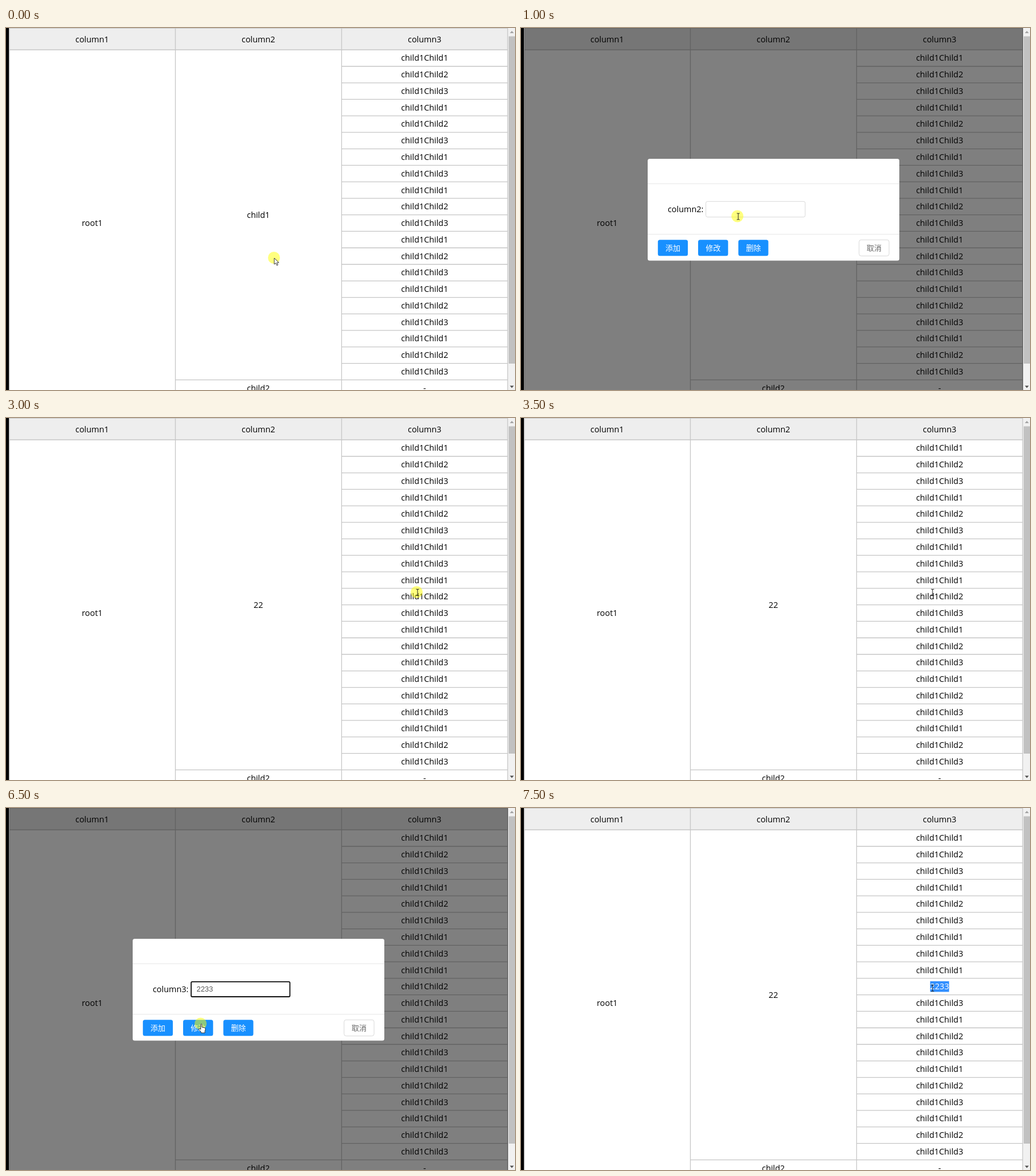
These frames come from a looping animation (888 by 631 pixels, 8000 ms). An HTML page:

```html
<!DOCTYPE html>
<html lang="en">
<head>
<meta charset="utf-8">
<title>Table editor</title>
<style>
  html, body { margin: 0; width: 100%; height: 100%; overflow: hidden; background: #fff; }
  svg { display: block; width: 888px; height: 631px; }
  text { font: 14.4px "Open Sans", "Noto Sans", sans-serif; }
  .mid { text-anchor: middle; }
  .btn { font: 500 13px "Noto Sans CJK SC", "Noto Sans CJK", sans-serif; }
  #value { font: 12.8px "Liberation Sans", Arial, sans-serif; fill: #555; }
</style>
</head>
<body>
<svg viewBox="0 0 888 631">
  <g id="table">
    <rect width="5.5" height="631"/>
    <rect x="5.5" width="870" height="38" fill="#eee"/>
    <path id="lines" fill="none" stroke="#c6c6c6" stroke-width="1.3"/>
    <rect id="mark" y="302" height="18.5" fill="#3390ff"/>
  </g>
  <rect id="shade" x="5.5" width="870.5" height="631" opacity=".5"/>
  <g id="scrollbar">
    <rect x="876" width="12" height="631" fill="#f1f1f1"/>
    <rect x="877" y="14.500" width="11" height="570.5" fill="#c1c1c1"/>
    <path d="M879 9l3.500-4 3.500 4z" fill="#a3a3a3"/>
    <path d="M879 623.500l3.500 4 3.500-4z" fill="#505050"/>
  </g>
  <g id="dialog">
    <rect x="221" y="228" width="439" height="177.500" rx="3.500" fill="#fff"/>
    <path d="M221 271.500H660M221 359.500H660" stroke="#e8e8e8"/>
    <text id="label" x="256" y="321.300"></text>
    <rect id="field" fill="#fff"/>
    <text id="value" x="332.600" y="319.500"></text>
    <rect id="caret" y="308" width="1" height="14"/>
  </g>
  <circle id="halo" r="10.500" fill="#ff0" opacity=".5"/>
  <g id="cursor" stroke-linejoin="round">
    <path id="arrow" d="M.5 .5V11.500L3 9.200 5 13.300 6.900 12.500 5 8.500H8.600Z" fill="#fff" stroke="#222" stroke-width=".9"/>
    <path id="beam" d="M-1 -5H.5Q1.500 -5 1.500 -4Q1.500 -5 2.500 -5H4M1.500 -4.500V5.500M-1 6H.5Q1.500 6 1.500 5Q1.500 6 2.500 6H4" fill="none" stroke="#222"/>
    <path id="hand" d="M.2 1.200Q1.300 -.4 2.300 1.200V6L6.800 7Q8.700 7.500 8.500 9.500L7.500 13V16H.8V14.500L-3 10Q-3.500 8.300 -2 8.300L.2 10Z" fill="#fff" stroke="#222" stroke-width=".9"/>
  </g>
</svg>
<script>
const $ = id => document.getElementById(id);

function add(parent, tag, attrs, content = "") {
  const el = document.createElementNS("http://www.w3.org/2000/svg", tag);
  for (const key in attrs) el.setAttribute(key, attrs[key]);
  el.textContent = content;
  return parent.appendChild(el);
}
const set = (el, attrs) => { for (const key in attrs) el.setAttribute(key, attrs[key]); };
const show = (el, on) => { el.style.display = on ? "" : "none"; };
const cell = (x, middle, content) =>
  add($("table"), "text", { class: "mid", x, y: middle + 5 }, content);

// Table
const ROW = 28.77, TOP = 38;
const centers = [150.3, 440.3, 730.3];
let grid = "M5.5 .3H875.5M5.5 38H875.5M295.5 613.4H875.5";
for (const x of [5.8, 295.5, 585.5, 875.2]) grid += `M${x} 0V631`;
const leaves = [..."12312313123123123123"].map((n, i) => {
  if (i) grid += `M585.5 ${TOP + i * ROW}H875.5`;
  return cell(centers[2], TOP + (i + .5) * ROW, "child1Child" + n);
});
set($("lines"), { d: grid });
centers.forEach((x, i) => cell(x, 19.5, "column" + (i + 1)));
cell(centers[0], 340.3, "root1");
const child = cell(centers[1], 326, "child1");
cell(centers[1], 628, "child2");
cell(centers[2], 628, "-");
const leaf = leaves[9];

// Dialog buttons
["添加", "修改", "删除", "取消"].forEach((name, i) => {
  const plain = i === 3, x = plain ? 589.8 : 238.8 + i * 70.2;
  add($("dialog"), "rect", {
    x, y: 369.3, width: 52.3, height: 28, rx: 3.5,
    fill: plain ? "#fff" : "#1890ff", stroke: plain ? "#d9d9d9" : "none"
  });
  add($("dialog"), "text", {
    class: "btn mid", x: x + 26.2, y: 388, fill: plain ? "#666" : "#fff",
    ...(plain && { style: "font-weight:400" })
  }, name);
});

// One entry per half second: cursor, x, y, halo, edited column, typed text, caret
const steps = [
  ["arrow", 467.5, 400.5, 1],
  ["arrow", 467.5, 400.5, 0],
  ["beam", 377.5, 328, 1, 2],
  ["arrow", 363, 351, 0, 2, "", 1],
  ["arrow", 363, 351, 0, 2, "22", 1],
  ["hand", 356, 373.5, 1, 2, "22"],
  ["beam", 716.5, 303.5, 1],
  ["beam", 716.5, 303.5, 0],
  ["beam", 441, 305.5, 1, 3],
  ["beam", 441, 305.5, 0, 3, "2", 1],
  ["beam", 441, 305.5, 0, 3, "22", 1],
  ["beam", 441, 305.5, 0, 3, "223", 1],
  ["beam", 441, 305.5, 0, 3, "2233"],
  ["hand", 339.5, 376, 1, 3, "2233"],
  ["beam", 716.5, 313.5, 1],
  ["beam", 716.5, 313.5, 0]
];

function draw(index) {
  const [kind, x, y, halo, column, typed, caret] = steps[index];
  const focused = typed !== undefined;
  for (const id of ["arrow", "beam", "hand"]) show($(id), id === kind);
  set($("cursor"), { transform: `translate(${x} ${y})` });
  set($("halo"), { cx: x, cy: y });
  show($("halo"), halo);

  child.textContent = index < 6 ? "child1" : "22";
  leaf.textContent = index < 14 ? "child1Child2" : "2233";
  const marked = index === 8 || index === 15;
  const width = index === 15 ? 33 : 84;
  set($("mark"), { x: centers[2] - width / 2, width });
  show($("mark"), marked);
  set(leaf, { fill: marked ? "#fff" : "#000" });

  show($("shade"), column);
  show($("dialog"), column);
  $("label").textContent = `column${column}:`;
  $("value").textContent = typed || "";
  set($("field"), focused
    ? { x: 323, y: 302.8, width: 172.3, height: 26.2, rx: 2, stroke: "#101010", "stroke-width": 1.8 }
    : { x: 322.5, y: 302.3, width: 173.3, height: 27.2, rx: 3, stroke: "#d9d9d9", "stroke-width": 1 });
  set($("caret"), { x: 332.5 + 7.05 * (typed || "").length });
  show($("caret"), caret);
}

let current = -1;
function tick() {
  const index = Math.floor(performance.now() % 8000 / 500);
  if (index !== current) draw(current = index);
  requestAnimationFrame(tick);
}
tick();
</script>
</body>
</html>
```
